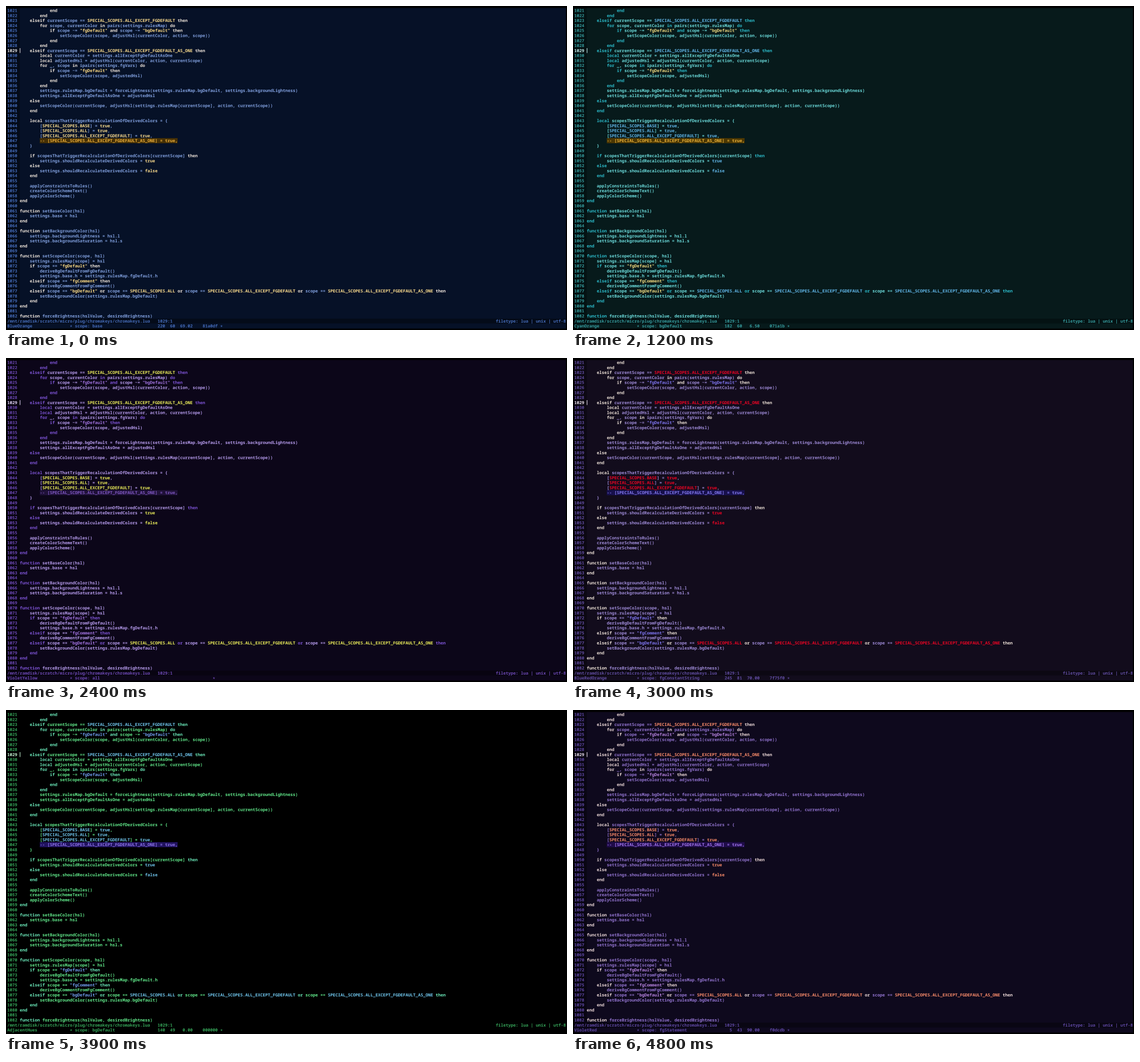
These frames come from a looping animation (984x569 px, 5100 ms). An HTML page with a canvas:

```html
<!DOCTYPE html>
<html lang="en">
<head>
<meta charset="utf-8">
<title>Colour schemes</title>
<style>
html, body { margin: 0; width: 100%; height: 100%; overflow: hidden; background: #000; }
canvas { display: block; width: 984px; height: 569px; }
</style>
</head>
<body>
<canvas id="stage" width="984" height="569"></canvas>
<script>
const W = 984, H = 569, SCALE = 2;
const LEFT = 2.2, TOP = 3.5, CW = 4.394, RH = 8.795, COLS = 223;
const FIRST = 1021, CURRENT = 1029, GUTTER = 5, STEP = 300;
const FONT = `700 ${CW / 0.6 * SCALE}px "Noto Sans Mono", "DejaVu Sans Mono", monospace`;

const code = `            end
        end
    elseif currentScope == SPECIAL_SCOPES.ALL_EXCEPT_FGDEFAULT then
        for scope, currentColor in pairs(settings.rulesMap) do
            if scope ~= "fgDefault" and scope ~= "bgDefault" then
                setScopeColor(scope, adjustHsl(currentColor, action, scope))
            end
        end
    elseif currentScope == SPECIAL_SCOPES.ALL_EXCEPT_FGDEFAULT_AS_ONE then
        local currentColor = settings.allExceptFgDefaultAsOne
        local adjustedHsl = adjustHsl(currentColor, action, currentScope)
        for _, scope in ipairs(settings.fgVars) do
            if scope ~= "fgDefault" then
                setScopeColor(scope, adjustedHsl)
            end
        end
        settings.rulesMap.bgDefault = forceLightness(settings.rulesMap.bgDefault, settings.backgroundLightness)
        settings.allExceptFgDefaultAsOne = adjustedHsl
    else
        setScopeColor(currentScope, adjustHsl(settings.rulesMap[currentScope], action, currentScope))
    end

    local scopesThatTriggerRecalculationOfDerivedColors = {
        [SPECIAL_SCOPES.BASE] = true,
        [SPECIAL_SCOPES.ALL] = true,
        [SPECIAL_SCOPES.ALL_EXCEPT_FGDEFAULT] = true,
        -- [SPECIAL_SCOPES.ALL_EXCEPT_FGDEFAULT_AS_ONE] = true,
    }

    if scopesThatTriggerRecalculationOfDerivedColors[currentScope] then
        settings.shouldRecalculateDerivedColors = true
    else
        settings.shouldRecalculateDerivedColors = false
    end

    applyConstraintsToRules()
    createColorSchemeText()
    applyColorScheme()
end

function setBaseColor(hsl)
    settings.base = hsl
end

function setBackgroundColor(hsl)
    settings.backgroundLightness = hsl.l
    settings.backgroundSaturation = hsl.s
end

function setScopeColor(scope, hsl)
    settings.rulesMap[scope] = hsl
    if scope == "fgDefault" then
        deriveBgDefaultFromFgDefault()
        settings.base.h = settings.rulesMap.fgDefault.h
    elseif scope == "fgComment" then
        deriveBgCommentFromFgComment()
    elseif scope == "bgDefault" or scope == SPECIAL_SCOPES.ALL or scope == SPECIAL_SCOPES.ALL_EXCEPT_FGDEFAULT or scope == SPECIAL_SCOPES.ALL_EXCEPT_FGDEFAULT_AS_ONE then
        setBackgroundColor(settings.rulesMap.bgDefault)
    end
end

function forceBrightness(hslValue, desiredBrightness)`.split("\n");

const TOKEN = /(?<comment>--.*)|(?<string>"[^"]*")|(?<constant>\b(?:true|false|[A-Z]+_[A-Z_]+(?:\.[A-Z_]+)?)\b)|(?<keyword>\b(?:end|elseif|else|then|for|in|do|if|and|or|local|function)\b)|(?<text>[^\s"]+?(?=\b|\s|$|"))/g;

const BASE = ["bg", "dark", "text", "number", "current"];
const ACCENT = ["keyword", "constant", "string", "comment", "mark"];
const palette = (base, accent) => {
  const p = {};
  base.split(" ").forEach((c, i) => p[BASE[i]] = "#" + c);
  accent.split(" ").forEach((c, i) => p[ACCENT[i]] = "#" + c);
  return p;
};

const palettes = {
  blue: palette("061127 040b19 81a0df 446bb8 e6e4e4", "f0e6dc ffdf8f ffdc86 eeb03c 453006"),
  teal: palette("0a1e28 07151c a6c4bf 4d8795 e8e6ee", "f0dbf0 f0edcf dde5c8 b58a8c 3a2228"),
  cyan: palette("071a1b 041213 6cdddd 369c9e c8f2f2", "2cbccb 62b9ec f2dc82 eab23a 4b3703"),
  violet: palette("0c0619 080411 b79cee 6c48b4 e4d8fa", "7e54d6 f0f25c a173e0 8058c4 1f1138"),
  red: palette("120c1c 0c0813 a08cda 614da2 ece4ee", "eee2d8 f00424 7f75f0 857bf2 17104c"),
  green: palette("000000 000000 62ec8c 35a358 c8f8d6", "6cecbc 72caf2 72a0f2 8f76ea 20125e"),
  plum: palette("0e091d 090613 9475d2 5f48a4 ece2f0", "f0dcdb ff8e6c b884e2 a578f2 1f0c49")
};

const hsl = (h, s, l, hex) =>
  `${String(h).padStart(3)}  ${s}  ${l.toFixed(2).padStart(5)}    ${hex} *`;
const message = (name, scope, detail) =>
  name.padEnd(25) + "* " + ("scope: " + scope).padEnd(33) + detail;
const ALL = " ".repeat(22) + "*";
const messages = {
  blue: message("BlueOrange", "base", hsl(220, 60, 69.02, "81a0df")),
  teal: message("CyanYellow", "fgStatement", hsl(300, 43, 90, "f0dbf0")),
  tealAll: message("CyanYellow", "all", ALL),
  cyan: message("CyanOrange", "bgDefault", hsl(182, 60, 6.5, "071a1b")),
  violet: message("VioletYellow", "all", ALL),
  violetKey: message("VioletYellow", "fgStatement", hsl(300, 43, 90, "f0dbf0")),
  red: message("BlueRedOrange", "fgConstantString", hsl(245, 81, 70, "7f75f0")),
  green: message("AdjacentHues", "bgDefault", hsl(140, 49, 0, "000000")),
  greenAll: message("AdjacentHues", "all", ALL),
  plum: message("VioletRed", "fgStatement", hsl(5, 43, 90, "f0dcdb"))
};

// base colours, accent colours, message line
const scenes = [
  "blue blue blue", "teal cyan tealAll", "teal teal teal", "blue cyan blue",
  "cyan cyan cyan", "violet plum violet", "violet red violetKey", "violet plum violetKey",
  "violet violet violet", "blue plum blue", "red red red", "teal red teal",
  "teal cyan tealAll", "green green green", "green cyan greenAll", "blue blue blue",
  "plum plum plum"
].map(s => s.split(" "));

function makeCanvas(w, h) {
  const c = document.createElement("canvas");
  c.width = w;
  c.height = h;
  return c;
}

const big = makeCanvas(W * SCALE, H * SCALE);
const pen = big.getContext("2d");

const colX = col => (LEFT + col * CW) * SCALE;
const rowY = row => Math.round((TOP + row * RH) * SCALE);

function cells(row, col, count, color) {
  pen.fillStyle = color;
  pen.fillRect(colX(col), rowY(row), count * CW * SCALE, rowY(row + 1) - rowY(row));
}

function write(row, col, text, color) {
  pen.fillStyle = color;
  const y = rowY(row) + 14;
  [...text].forEach((ch, i) => {
    if (ch !== " ") pen.fillText(ch, colX(col + i), ch === "*" ? y + 2.5 : y);
  });
}

function render([base, accent, note]) {
  const p = { ...palettes[base] };
  for (const key of ACCENT) p[key] = palettes[accent][key];
  pen.fillStyle = "#000";
  pen.fillRect(0, 0, big.width, big.height);
  pen.font = FONT;
  pen.textRendering = "geometricPrecision";
  pen.textBaseline = "alphabetic";

  const status = code.length;
  pen.fillStyle = p.bg;
  pen.fillRect(colX(0), rowY(0), COLS * CW * SCALE, rowY(status + 2) - rowY(0));
  pen.fillStyle = p.dark;
  pen.fillRect(colX(0), rowY(0), GUTTER * CW * SCALE, rowY(status) - rowY(0));
  cells(status, 0, COLS, p.dark);

  code.forEach((line, row) => {
    const n = FIRST + row;
    write(row, 0, String(n), n === CURRENT ? p.current : p.number);
    for (const m of line.matchAll(TOKEN)) {
      const kind = Object.keys(m.groups).find(k => m.groups[k]);
      if (kind === "comment") cells(row, GUTTER + m.index, m[0].length, p.mark);
      write(row, GUTTER + m.index, m[0], p[kind]);
    }
  });

  const at = CURRENT - FIRST;
  pen.fillStyle = p.current;
  pen.fillRect(colX(GUTTER), rowY(at), 2, rowY(at + 1) - rowY(at));

  const right = "filetype: lua | unix | utf-8";
  write(status, 0, "/mnt/ramdisk/scratch/micro/plug/chromakeys/chromakeys.lua   1029:1", p.number);
  write(status, COLS - right.length, right, p.number);
  write(status + 1, 0, messages[note], p.number);

  const out = makeCanvas(W, H);
  const ctx = out.getContext("2d");
  ctx.imageSmoothingQuality = "high";
  ctx.drawImage(big, 0, 0, W, H);
  return out;
}

const stage = document.getElementById("stage").getContext("2d");
const cache = {};
let shown = -1;
const start = performance.now();

function frame() {
  const i = Math.floor((performance.now() - start) / STEP) % scenes.length;
  if (i !== shown) {
    const key = scenes[i].join();
    cache[key] = cache[key] || render(scenes[i]);
    stage.drawImage(cache[key], 0, 0);
    shown = i;
  }
  requestAnimationFrame(frame);
}
frame();
</script>
</body>
</html>
```
